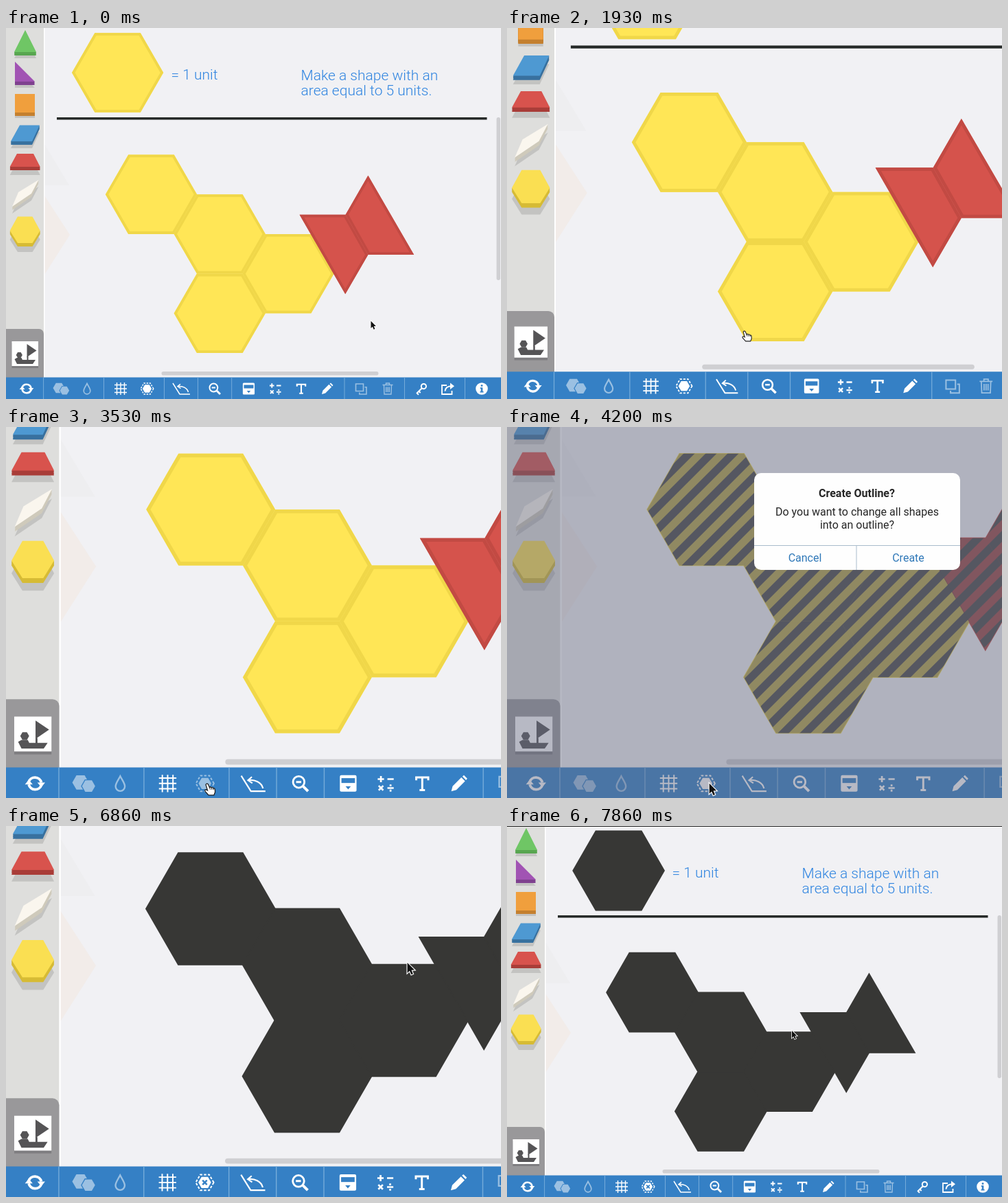
An HTML page with a canvas that plays this animation: 721x540 px, repeating every 9.2 s.

```html
<!DOCTYPE html>
<html lang="en">
<head>
<meta charset="utf-8">
<title>Pattern shapes</title>
<style>
html, body { margin: 0; width: 100%; height: 100%; overflow: hidden; background: #f1f1f4; }
canvas { display: block; }
</style>
</head>
<body>
<canvas id="stage" width="721" height="540"></canvas>
<script>
const ctx = document.getElementById('stage').getContext('2d');
const W = 721, H = 540, LOOP = 9200, ZOOM = 1.41;
const DARK = '#373735', BLUE = '#3580c5', WHITE = '#fff';
const YELLOW = ['#ffe656', '#f0d749'], RED = ['#d5534c', '#c24a43'];

const clamp = v => Math.max(0, Math.min(1, v));
const progress = (t, from, to) => clamp((t - from) / (to - from));
const smooth = p => p * p * (3 - 2 * p);

function poly(...pts) {
  const path = new Path2D();
  for (let i = 0; i < pts.length; i += 2) path.lineTo(pts[i], pts[i + 1]);
  path.closePath();
  return path;
}
function hexagon(x, y, r) {
  const pts = [];
  for (let i = 0; i < 6; i++) pts.push(x + r * Math.cos(i * Math.PI / 3), y + r * Math.sin(i * Math.PI / 3));
  return poly(...pts);
}
function fill(path, color) { ctx.fillStyle = color; ctx.fill(path); }
function stroke(path, color, width) { ctx.strokeStyle = color; ctx.lineWidth = width; ctx.stroke(path); }
function rect(x, y, w, h, color, radius = 0) {
  ctx.fillStyle = color;
  ctx.beginPath();
  ctx.roundRect(x, y, w, h, radius);
  ctx.fill();
}
function text(str, x, y, font, color, align = 'left') {
  ctx.font = font + ' Roboto, sans-serif';
  ctx.fillStyle = color;
  ctx.textAlign = align;
  ctx.fillText(str, x, y);
}

// Pieces on the canvas
const cell = (col, row) => ({ path: hexagon(211.5 + 99.8 * col, 242.2 + 57.7 * row, 66.6), colors: YELLOW });
const pieces = [
  { path: hexagon(162.6, 65, 66.6), colors: YELLOW },
  cell(0, 0), cell(1, 1), cell(2, 2), cell(1, 3),
  { path: poly(427.6, 271.7, 494.6, 271.7, 527.4, 330, 494.2, 387.3), colors: RED },
  { path: poly(527.4, 214.8, 594.2, 330, 527.4, 330, 494.6, 271.7), colors: RED }
];

function drawPiece({ path, colors }) {
  fill(path, colors[0]);
  ctx.save();
  ctx.clip(path);
  stroke(path, colors[1], 7.6);
  ctx.restore();
}

// Diagonal stripes keep a fixed 32 pixel pitch on screen
const stripes = new Path2D();
for (let k = 16; k < W + H; k += 32) {
  stripes.moveTo(k, 0);
  stripes.lineTo(k - H, H);
}
function drawStriped() {
  pieces.forEach(p => stroke(p.path, p.colors[1], 1.2));
  pieces.forEach(p => fill(p.path, p.colors[0]));
  for (const p of pieces) {
    ctx.save();
    ctx.clip(p.path);
    ctx.setTransform(1, 0, 0, 1, 0, 0);
    const alpha = ctx.globalAlpha;
    ctx.globalAlpha = alpha * 0.36;
    ctx.fillStyle = DARK;
    ctx.fillRect(0, 0, W, H);
    ctx.globalAlpha = alpha;
    stroke(stripes, '#4a4a48', 11.4);
    ctx.restore();
  }
}
function drawOutline() {
  for (const p of pieces) {
    fill(p.path, DARK);
    stroke(p.path, DARK, 1.4);
  }
}

// Palette: face points, face color, side color, shadow drop
const palette = [
  [[28, 3, 44, 35, 12, 35], '#6fc665', '#58a650', 9],
  [[13, 49, 42, 78, 13, 78], '#a153b3', '#7f418f', 9],
  [[13, 96, 42, 96, 42, 123, 13, 123], '#f09f3d', '#c4802f', 8],
  [[20, 141.5, 49, 141.5, 38, 165, 7, 165], '#4e99d2', '#38719f', 10],
  [[16, 183, 40, 183, 49.7, 202, 5.7, 202], '#d8534d', '#a93d38', 12],
  [[47.5, 221, 37, 241, 9, 260, 18, 239], '#faf6ee', '#cfcabb', 10],
  [[17, 274.5, 38.5, 274.5, 49.7, 295, 38.5, 313, 17, 313, 5.7, 295], '#fadf52', '#d6bb35', 13]
];
const dropped = (pts, dy) => pts.map((v, i) => i % 2 ? v + dy : v);

function drawSidebar() {
  rect(0, -400, 55, 910, '#dededc');
  rect(55, -400, 1.6, 910, WHITE);
  for (const [pts, face, side, drop] of palette) {
    fill(poly(...dropped(pts, drop)), '#c3c3c1');
    for (let dy = 5; dy > 0; dy--) fill(poly(...dropped(pts, dy)), side);
    fill(poly(...pts), face);
  }
  rect(0, 438, 55, 72, '#99989a', [0, 7, 0, 0]);
  rect(8.5, 459, 38.5, 36, '#7e7d80');
  rect(8.5, 456, 38.5, 36, WHITE);
  const ink = '#555456';
  fill(hexagon(19.3, 476, 4.6), ink);
  fill(poly(30.5, 460, 44.5, 469.5, 30.5, 479), ink);
  fill(poly(30.5, 478, 32.5, 478, 32.5, 483, 43, 483, 39, 489, 16, 489, 12.5, 482, 16, 480, 22.5, 480, 24, 483, 30.5, 483), ink);
}

// Toolbar icons are drawn around their own centre
const line = (d, width = 1.7) => stroke(new Path2D(d), WHITE, width);
const solid = (d, color = WHITE) => fill(new Path2D(d), color);
const icons = [
  [30, () => {
    for (let i = 0; i < 2; i++) {
      line('M-6.6-1.5A6.8 6.8 0 0 1 6.5-1', 2.7);
      solid('M2.4-1H10.4L6.5 3.8Z');
      ctx.rotate(Math.PI);
    }
  }],
  [80, () => {
    fill(hexagon(-3, -1, 8.5), '#9bc0e2');
    stroke(hexagon(5.3, 2.7, 7), BLUE, 1.5);
    fill(hexagon(5.3, 2.7, 6.8), '#9bc0e2');
  }],
  [118, () => line('M0-7.5C2-3.5 4.8 0 4.8 3A4.8 4.8 0 0 1-4.8 3C-4.8 0-2-3.5 0-7.5Z'), 0.5],
  [167, () => line('M-5.5-9V9M0-9V9M5.5-9V9M-9-5.5H9M-9 0H9M-9 5.5H9', 1.4)],
  [205.5, outlined => {
    fill(hexagon(0, 0, 6.6), WHITE);
    ctx.setLineDash([2.5, 1.6]);
    stroke(hexagon(0, 0, 9.3), WHITE, 1.4);
    ctx.setLineDash([]);
    if (outlined) stroke(new Path2D('M-2.3-2.3L2.3 2.3M2.3-2.3L-2.3 2.3'), BLUE, 1.8);
  }],
  [255, () => line('M-12-8L-2 8H13M10.5 5C9-1 2-4.5-5-3.3M-1-6.8L-5-3.3L-.5-.3', 1.5)],
  [304, () => {
    line('M4.3-1.5A5.9 5.9 0 1 1-7.5-1.5A5.9 5.9 0 1 1 4.3-1.5M-4.3-1.5H1', 2);
    line('M3 3L8 8', 2.8);
  }],
  [353.5, () => {
    rect(-8.6, -8.5, 17.2, 17, WHITE, 1.5);
    rect(-7, -5.5, 14, 5, BLUE);
    solid('M-2.7 3H2.7L0 6.2Z', BLUE);
  }],
  [392, () => {
    line('M-8-4.5H-1.5M-4.7-7.7V-1.3M2-4.5H8.5M-7 2.3L-2.3 7M-2.3 2.3L-7 7M2 4.7H8.5', 1.9);
    solid('M4.3 1H6.2V3H4.3ZM4.3 6.4H6.2V8.4H4.3Z');
  }],
  [430, () => line('M-6.2-3.2V-6.3H6.2V-3.2M0-6.3V6.8M-2.8 6.8H2.8', 2.1)],
  [468, () => solid('M-8 8L-6.6 2.8L2.4-6.2L6.2-2.4L-2.8 6.6ZM3.5-7.2L5-8.5L8.5-5L7.2-3.5Z')],
  [517, () => line('M-7.5-7H3.5V3.5H-7.5ZM5.5-2.2H8V8H-2.2V5.5', 1.6), 0.5],
  [556, () => line('M-7.5-5.5H7.5M-2.5-5.5V-8H2.5V-5.5M-5.5-5.5L-5 8H5L5.5-5.5M-2.3-2.5V5M0-2.5V5M2.3-2.5V5', 1.4), 0.5],
  [605, () => line('M7-3.4A3.6 3.6 0 1 1-.2-3.4A3.6 3.6 0 1 1 7-3.4M.8-.8L-7 7M-6.5 6.5L-4 8.8M-3.8 3.8L-1.3 6', 2)],
  [643, () => {
    line('M-1-5H-8V8H6.5V3', 1.8);
    line('M-3.5 3.5C-3-1 0-3.5 5-3.7', 2);
    solid('M4-8.5L10-3.7L4 1Z');
  }],
  [693, () => {
    rect(-8.8, -8.8, 17.6, 17.6, WHITE, 8.8);
    solid('M-1.3-5.7H1.3V-3.2H-1.3ZM-2.3-1.8H1.3V3.8H2.5V5.5H-2.5V3.8H-1.3V0H-2.3Z', BLUE);
  }]
];

function drawToolbar(pressed, outlined) {
  rect(0, 508.4, W, 32, BLUE);
  for (const x of [54.6, 142.5, 230.5, 279.5, 328.7, 493, 580.5, 668.5]) rect(x - 0.5, 508.4, 1, 32, '#75abda');
  for (const [x, draw, alpha = 1] of icons) {
    ctx.save();
    ctx.translate(x, 525);
    ctx.globalAlpha = pressed && x === 205.5 ? 0.5 : alpha;
    draw(outlined);
    ctx.restore();
  }
}

function drawBoard(t, dialog) {
  const outlined = t >= 5860;
  rect(0, -400, 1200, 940, '#f1f1f4');
  fill(poly(56, 169, 92, 229, 56, 229), '#eeeef0');
  fill(poly(56, 244, 93, 301, 56, 359), '#f2ece9');
  text('= 1 unit', 240.5, 75, '300 21px', '#2f84e0');
  text('Make a shape with an', 429.5, 75.5, '300 21px', '#2f84e0');
  text('area equal to 5 units.', 429.5, 97.5, '300 21px', '#2f84e0');
  rect(74, 130, 626.5, 3.4, '#262a28');
  if (outlined) drawOutline();
  else {
    pieces.forEach(drawPiece);
    if (dialog) {
      ctx.globalAlpha = dialog;
      drawStriped();
      ctx.globalAlpha = 1;
    }
  }
  rect(714.5, 130, 5.5, 237, '#cfcfd2', 2.7);
  rect(226.5, 500, 316, 5.6, '#cfcfd2', 2.8);
  drawSidebar();
  drawToolbar(t >= 3530 && t < 3600, outlined);
}

function drawDialog(t, alpha) {
  ctx.globalAlpha = alpha;
  rect(0, 0, W, H, 'rgba(98,104,126,.46)');
  rect(360, 67, 300, 141, '#fefefe', 10);
  const press = t < 5330 ? 0 : t < 5400 ? 0.5 : 1;
  ctx.globalAlpha = alpha * press;
  rect(509, 173, 151, 35, '#a6cee6', [0, 0, 10, 0]);
  ctx.globalAlpha = alpha;
  rect(360, 172, 300, 1, '#a9bccb');
  rect(508.5, 172, 1, 36, '#a9bccb');
  text('Create Outline?', 509.5, 102, 'bold 16px', '#262626', 'center');
  text('Do you want to change all shapes', 510, 129, '16px', '#262626', 'center');
  text('into an outline?', 510, 148, '16px', '#262626', 'center');
  text('Cancel', 434, 196, '16px', '#2f78b8', 'center');
  text('Create', 584.5, 196, '16px', press ? '#235f9c' : '#2f78b8', 'center');
  ctx.globalAlpha = 1;
}

// Cursor moves: start, end, x, y
const moves = [
  [730, 1130, 490.5, 434],
  [1400, 1930, 276.8, 461],
  [1930, 2530, 209, 525],
  [4400, 5260, 415, 298]
];
const arrow = poly(0, 0, 0, 10.5, 2.4, 8.3, 4.1, 12.2, 5.9, 11.4, 4.2, 7.6, 7.4, 7.4);
const hand = new Path2D('M-2.6 1.2Q-1.6-.6-.2.8L1.2 4Q2.4 3.2 3.2 4.3Q4.6 3.7 5.2 4.9Q6.6 4.6 6.9 6.4L7 9L5.8 12H.2L-3.2 8.2Q-4 6.6-2.6 6.3L-.8 7.2Z');

function drawCursor(t) {
  let x = 531.5, y = 426.5;
  for (const [from, to, nextX, nextY] of moves) {
    const p = smooth(progress(t, from, to));
    x += (nextX - x) * p;
    y += (nextY - y) * p;
  }
  const pointing = x < 352 && t < 3600 || t >= 5200 && t < 5860;
  ctx.save();
  ctx.translate(x, y);
  if (pointing) {
    fill(hand, WHITE);
    stroke(hand, '#222', 0.9);
    stroke(new Path2D('M1.2 4L2 6.3M3.2 4.3L3.8 6.5M5.2 4.9L5.5 6.6'), '#222', 0.7);
  } else {
    stroke(arrow, WHITE, 1.6);
    fill(arrow, '#111');
  }
  ctx.restore();
}

function render(t) {
  const zoom = progress(t, 1398, 2255) - progress(t, 6858, 7740);
  const scale = 1 + (ZOOM - 1) * zoom;
  const dialog = progress(t, 3570, 4170) * (1 - progress(t, 5810, 6000));
  const shown = t < 5860 ? progress(t, 3570, 4170) : dialog;
  const toWorld = () => ctx.setTransform(scale, 0, 0, scale, 0, H * (1 - scale));
  toWorld();
  drawBoard(t, shown);
  ctx.setTransform(1, 0, 0, 1, 0, 0);
  if (shown) drawDialog(t, shown);
  if (t >= 7800) rect(0, 0, W, 1, '#222');
  toWorld();
  drawCursor(t);
}

const start = performance.now();
function tick() {
  render((performance.now() - start) % LOOP);
  requestAnimationFrame(tick);
}
tick();
</script>
</body>
</html>
```
